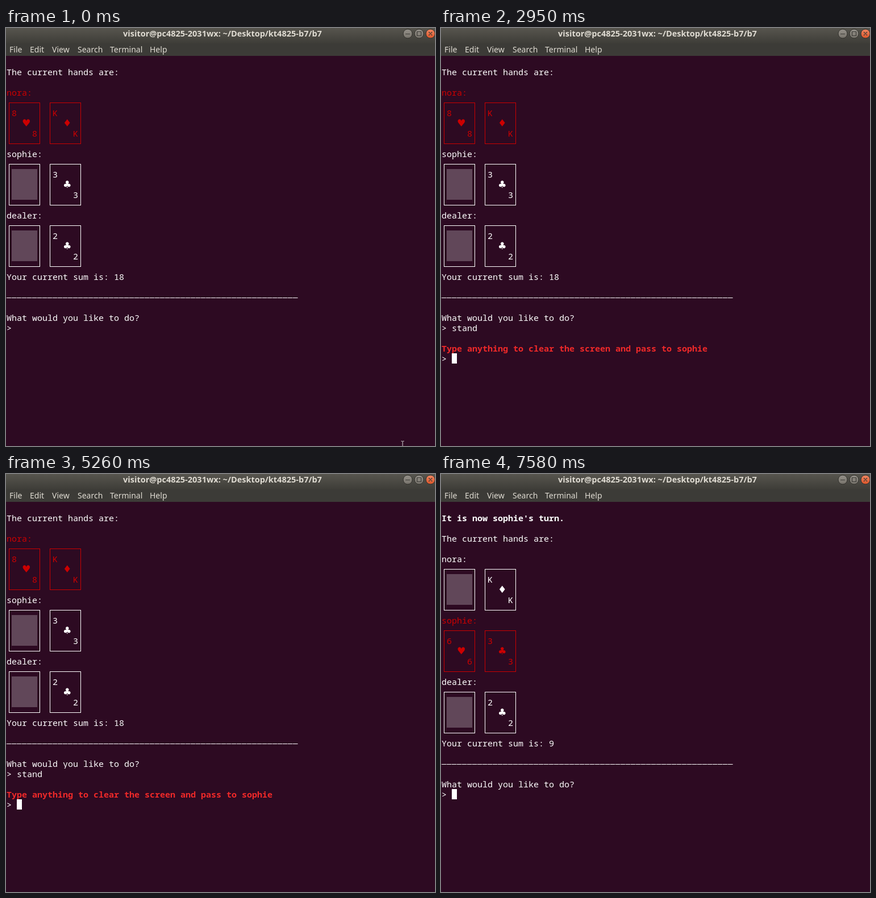
An HTML page for the animation above (8 s loop, 755x735 px).

```html
<!DOCTYPE html>
<html lang="en">
<head>
<meta charset="utf-8">
<title>Card game in a terminal</title>
<style>
  html, body { margin: 0; width: 100%; height: 100%; overflow: hidden; background: #2d0a22; }
  svg { display: block; }
  text { white-space: pre; }
  .title { font: bold 14.5px "Noto Sans", "Open Sans", sans-serif; fill: #dfdbd2; text-anchor: middle; }
  .menu { font: 14px "Noto Sans", "Open Sans", sans-serif; fill: #dfdbd2; }
  .term { font: 15px "Noto Sans Mono", "Liberation Mono", monospace; fill: #fff; }
  .term .suit { font: 17.3px "DejaVu Sans", sans-serif; }
  .term .bold { font-weight: bold; }
  .term .active { fill: #c00; }
  .term .alert { fill: #ef2929; font-weight: bold; }
  .term .frame { fill: none; stroke: #fff; }
  .term .frame.active { stroke: #c00; }
  .rule { stroke: #fff; stroke-width: 1.2; stroke-dasharray: 8.5 .5; }
  .back { fill: #614759; }
  .glyph { fill: none; stroke: #3c3b37; stroke-width: 1.2; }

  /* One loop is 8 s, so 1% is 80 ms. */
  .anim { animation: 8s step-end infinite; }
  #turn1 { animation-name: turn1; }
  #pass { animation-name: pass; }
  #wait { animation-name: wait; }
  #turn2 { animation-name: turn2; }
  #cover { animation-name: type; }
  #cursor { animation-name: cursor; }
  #beam { animation-name: beam; }
  #arrow { animation-name: arrow; }
  #scroll { animation-name: scroll; animation-timing-function: linear; }

  @keyframes turn1 { 0% { opacity: 1 } 74.5%, 100% { opacity: 0 } }
  @keyframes pass { 0% { opacity: 0 } 36.875% { opacity: 1 } 74.5%, 100% { opacity: 0 } }
  @keyframes wait { 0% { opacity: 0 } 74.5% { opacity: 1 } 94.75%, 100% { opacity: 0 } }
  @keyframes turn2 { 0% { opacity: 0 } 94.75%, 100% { opacity: 1 } }

  @keyframes type {
    0% { transform: translateX(0) }
    18.375% { transform: translateX(9px) }
    19.25% { transform: translateX(18px) }
    21.125% { transform: translateX(27px) }
    22.125% { transform: translateX(36px) }
    24.25%, 100% { transform: translateX(46px) }
  }
  @keyframes cursor {
    0% { transform: translate(19px, 518px); opacity: 0 }
    3.875% { opacity: 1 }
    10.5% { opacity: 0 }
    17.375% { opacity: 1 }
    18.375% { transform: translate(28px, 518px) }
    19.25% { transform: translate(37px, 518px) }
    21.125% { transform: translate(46px, 518px) }
    22.125% { transform: translate(55px, 518px) }
    24.25% { transform: translate(64px, 518px) }
    30.875% { opacity: 0 }
    35.875% { opacity: 1 }
    36.875% { transform: translate(19px, 572px) }
    43.5% { opacity: 0 }
    51% { opacity: 1 }
    58.25% { opacity: 0 }
    65.75% { opacity: 1 }
    74.5% { transform: translate(19px, 302px) }
    80.25% { opacity: 0 }
    87.125% { opacity: 1 }
    94.75%, 100% { transform: translate(19px, 554px); opacity: 1 }
  }
  @keyframes beam {
    0% { transform: translate(698px, 731px); opacity: 1 }
    2.875% { transform: translate(704px, 727px) }
    3.875% { transform: translate(711px, 724px) }
    4.75% { transform: translate(717px, 726px) }
    5.75% { transform: translate(722px, 731px) }
    6.75% { transform: translate(723px, 736px) }
    7.625% { opacity: 0 }
    51% { transform: translate(726px, 716px); opacity: 1 }
    52.125% { transform: translate(718px, 610px) }
    53.25% { transform: translate(712px, 530px) }
    54.25% { transform: translate(709px, 494px) }
    56.125%, 100% { opacity: 0 }
  }
  @keyframes arrow {
    0% { transform: translate(707px, 493px); opacity: 0 }
    54.25% { opacity: 1 }
    56.125% { transform: translate(711px, 540px) }
    57.125% { transform: translate(718px, 620px) }
    58.125%, 100% { opacity: 0 }
  }
  @keyframes scroll {
    0%, 51% { opacity: 0 }
    54.25%, 56.125% { opacity: 1 }
    61.875%, 100% { opacity: 0 }
  }
</style>
</head>
<body>
<svg width="755" height="735" viewBox="0 0 755 735">
  <defs>
    <linearGradient id="bar" x2="0" y2="1">
      <stop stop-color="#57554e"/><stop offset="1" stop-color="#3e3d38"/>
    </linearGradient>
    <linearGradient id="grey" x2="0" y2="1">
      <stop stop-color="#949089"/><stop offset="1" stop-color="#77736b"/>
    </linearGradient>
    <linearGradient id="orange" x2="0" y2="1">
      <stop stop-color="#f08763"/><stop offset="1" stop-color="#dd5529"/>
    </linearGradient>
  </defs>
  <rect width="755" height="735" fill="#2d0a22"/>

  <rect width="755" height="49" fill="#3c3b37"/>
  <rect width="755" height="27" fill="url(#bar)"/>
  <text class="title" x="381" y="15">visitor@pc4825-2031wx: ~/Desktop/kt4825-b7/b7</text>
  <g stroke="#33322d">
    <circle cx="707" cy="10" r="8" fill="url(#grey)"/>
    <circle cx="727" cy="10" r="8" fill="url(#grey)"/>
    <circle cx="747" cy="10" r="8" fill="url(#orange)"/>
  </g>
  <path class="glyph" d="M703 10.5h8M723.5 6.5h7v7h-7zM744 7l6 6m0-6l-6 6"/>
  <g class="menu">
    <text x="6" y="43">File</text>
    <text x="42" y="43">Edit</text>
    <text x="81" y="43">View</text>
    <text x="126" y="43">Search</text>
    <text x="183" y="43">Terminal</text>
    <text x="253" y="43">Help</text>
  </g>

  <g class="term">
    <g id="turn1" class="anim"></g>
    <g id="pass" class="anim"></g>
    <g id="wait" class="anim"></g>
    <g id="turn2" class="anim"></g>
  </g>
  <rect id="cursor" class="anim" width="9" height="18" fill="#fff"/>

  <g id="scroll" class="anim">
    <rect x="751" y="49" width="4" height="343" fill="#75606f"/>
    <rect x="751" y="392" width="4" height="343" fill="#e0694c"/>
  </g>
  <g id="beam" class="anim">
    <path d="M-2.5-4.5h2m1 0h2M0-4v8m-2.5.5h2m1 0h2" fill="none" stroke="#ddd"/>
  </g>
  <g id="arrow" class="anim">
    <path d="M.5.5v16l3.6-3.4 2.6 6 2.6-1.2-2.6-5.7h5z" fill="#fff" stroke="#000"/>
  </g>
</svg>
<script>
  const PLAYERS = ["nora", "sophie", "dealer"];
  const colX = c => 1 + 9 * c;
  const rowY = r => 50 + 18 * r;

  const put = (col, row, str, cls = "") =>
    `<text class="${cls}" x="${colX(col)}" y="${rowY(row) + 15}">${str}</text>`;

  // A card is a rank and a suit, or an empty string when face down.
  function card(col, row, face, cls) {
    const frame = `<rect class="frame ${cls}" x="${colX(col) + 4.5}" y="${rowY(row) + 9.5}" width="54" height="72"/>`;
    if (!face) {
      return frame + `<rect class="back" x="${colX(col + 1)}" y="${rowY(row + 1)}" width="45" height="54"/>`;
    }
    const [rank, suit] = face;
    return frame + put(col + 1, row + 1, rank, cls)
      + put(col + 3, row + 2, suit, "suit " + cls)
      + put(col + 5, row + 3, rank, cls);
  }

  function table(row, turn, hands, sum) {
    let out = put(0, row, "The current hands are:");
    hands.forEach((hand, i) => {
      const top = row + 2 + 6 * i, cls = i === turn ? "active" : "";
      out += put(0, top, PLAYERS[i] + ":", cls);
      hand.forEach((face, j) => out += card(8 * j, top + 1, face, cls));
    });
    return out + put(0, row + 20, "Your current sum is: " + sum)
      + `<path class="rule" d="M1 ${rowY(row + 22) + 10.5}h513"/>`
      + put(0, row + 24, "What would you like to do?")
      + put(0, row + 25, "&gt;");
  }

  const fill = (id, html) => document.getElementById(id).innerHTML = html;

  fill("turn1", table(1, 0, [["8♥", "K♦"], ["", "3♣"], ["", "2♣"]], 18)
    + put(2, 26, "stand")
    + '<rect id="cover" class="anim" x="19" y="518" width="46" height="18" fill="#2d0a22"/>');
  fill("pass", put(0, 28, `Type anything to clear the screen and pass to ${PLAYERS[1]}`, "alert")
    + put(0, 29, "&gt;"));
  fill("wait", put(0, 13, `Type anything to see ${PLAYERS[1]}'s turn.`) + put(0, 14, "&gt;"));
  fill("turn2", put(0, 1, `It is now ${PLAYERS[1]}'s turn.`, "bold")
    + table(3, 1, [["", "K♦"], ["6♥", "3♣"], ["", "2♣"]], 9));
</script>
</body>
</html>
```
